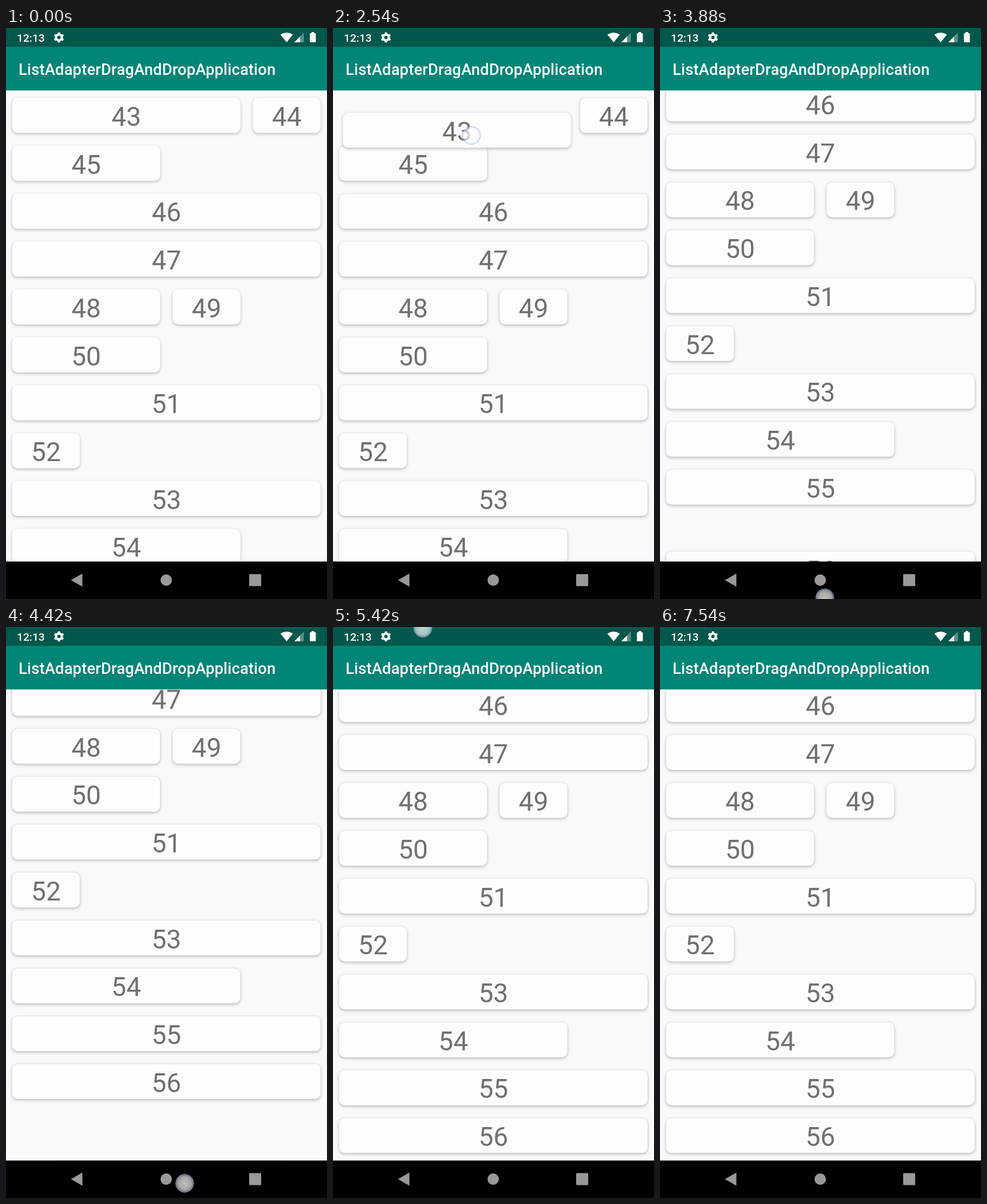
An HTML page with a canvas for the animation above (7.58 s loop, 561x998 px).

```html
<!DOCTYPE html>
<html lang="en">
<head>
<meta charset="utf-8">
<style>
  html, body { margin: 0; width: 100%; height: 100%; overflow: hidden; background: #000; }
  canvas { display: block; }
</style>
</head>
<body>
<canvas id="stage" width="561" height="998"></canvas>
<script>
const ctx = document.getElementById('stage').getContext('2d');
const LOOP = 7580, COL = 140.25, ROW = 83.7, LEFT = 10.5, TOP = 122;
const STATUS_END = 32.75, BAR_END = 109.16, NAV_TOP = 932.5;
const GRAB = { x: 225, y: 40 };
const RELEASE = 4720, REVERT = 4970, DRAG_START = 2420;

// Column spans of the cards 43 to 56
const spans = [3, 1, 2, 4, 4, 2, 1, 2, 4, 1, 4, 3, 4, 4];
// Moments at which the dragged card passes each following card
const swaps = [2640, 2650, 2730, 2820, 2900, 2920, 3010, 3110, 3210, 3310, 3420, 3600, 3790];

const touchPaths = [
  [[1850, 236, 162], [DRAG_START, 236, 162], [2540, 242, 187], [3420, 272, 905],
   [3880, 288, 996], [4300, 300, 990], [RELEASE, 342.5, 928.5]],
  [[4745, 283, 725], [4790, 280, 705], [5400, 157, 2], [5450, 157, 2]]
];
const scrollPath = [[3450, 0], [3650, 28], [3880, 103.3], [4150, 195.4]];
const END_SCROLL = 184.6;

const clamp = v => Math.min(1, Math.max(0, v));
const ease = v => (1 - Math.cos(Math.PI * clamp(v))) / 2;
const mix = (a, b, k) => a + (b - a) * k;

// Interpolates rows of [time, ...values], holding both ends
function sample(path, t) {
  let i = path.findIndex(p => p[0] > t);
  if (i < 0) return path[path.length - 1].slice(1);
  if (i === 0) return path[0].slice(1);
  const a = path[i - 1], b = path[i], k = (t - a[0]) / (b[0] - a[0]);
  return a.slice(1).map((v, n) => mix(v, b[n + 1], k));
}

// Flows the cards into four columns with the first one moved to `index`
function layout(index) {
  const order = spans.map((_, i) => i).slice(1);
  order.splice(index, 0, 0);
  const cells = [];
  let col = 0, row = 0;
  for (const i of order) {
    if (col + spans[i] > 4) { col = 0; row++; }
    cells[i] = { x: LEFT + col * COL, y: TOP + row * ROW };
    col += spans[i];
  }
  return cells;
}
const layouts = spans.map((_, i) => layout(i));

function cellAt(i, t) {
  const pos = { ...layouts[0][i] };
  if (t >= REVERT) return pos;
  swaps.forEach((start, n) => {
    const k = ease((t - start) / 250), a = layouts[n][i], b = layouts[n + 1][i];
    pos.x += (b.x - a.x) * k;
    pos.y += (b.y - a.y) * k;
  });
  return pos;
}

function draggedAt(t, scroll) {
  const [x, y] = sample(touchPaths[0], t);
  const held = { x: x - GRAB.x, y: y - GRAB.y };
  if (t < RELEASE) return held;
  const home = cellAt(0, t), k = ease((t - RELEASE) / (REVERT - RELEASE));
  return { x: mix(held.x, home.x, k), y: mix(held.y, home.y - scroll, k) };
}

function text(str, x, y, size, color, weight = 400, align = 'left', spacing = 0) {
  ctx.font = `${weight} ${size}px Roboto, sans-serif`;
  ctx.letterSpacing = `${spacing}px`;
  ctx.textAlign = align;
  ctx.fillStyle = color;
  ctx.fillText(str, x, y);
}

function shape(color, ...points) {
  ctx.fillStyle = color;
  ctx.beginPath();
  points.forEach(p => ctx.lineTo(...p));
  ctx.fill();
}

function disc(x, y, r, color) {
  ctx.fillStyle = color;
  ctx.beginPath();
  ctx.arc(x, y, r, 0, 7);
  ctx.fill();
}

function card(i, { x, y }, outline) {
  if (y > 940 || y < 20) return;
  const w = spans[i] * COL - 21.5;
  ctx.save();
  ctx.shadowColor = 'rgba(0,0,0,.25)';
  ctx.shadowBlur = 5;
  ctx.shadowOffsetY = 2;
  ctx.fillStyle = '#fdfdfd';
  ctx.beginPath();
  ctx.roundRect(x, y, w, 61.5, 10);
  ctx.fill();
  ctx.restore();
  ctx.strokeStyle = `rgba(0,0,0,${0.05 * outline})`;
  ctx.lineWidth = 1;
  ctx.stroke();
  text(43 + i, x + w / 2, y + 49, 46, '#707070', 400, 'center');
}

function list(t) {
  const scroll = t < REVERT ? sample(scrollPath, t)[0] : END_SCROLL;
  const dragging = t >= DRAG_START && t < REVERT;
  const outline = clamp(t / 800);
  for (let i = dragging ? 1 : 0; i < spans.length; i++) {
    const { x, y } = cellAt(i, t);
    card(i, { x, y: y - scroll }, outline);
  }
  if (dragging) card(0, draggedAt(t, scroll), outline);
}

function gear(x, y) {
  ctx.strokeStyle = '#fff';
  ctx.lineWidth = 4;
  ctx.beginPath();
  ctx.arc(x, y, 5, 0, 7);
  ctx.stroke();
  for (let n = 0; n < 6; n++) {
    const a = n * Math.PI / 3 + Math.PI / 6, c = Math.cos(a), s = Math.sin(a);
    ctx.beginPath();
    ctx.moveTo(x + c * 5, y + s * 5);
    ctx.lineTo(x + c * 8.8, y + s * 8.8);
    ctx.stroke();
  }
}

function bars() {
  ctx.fillStyle = '#008577';
  ctx.fillRect(0, 0, 561, BAR_END);
  ctx.fillStyle = '#00574b';
  ctx.fillRect(0, 0, 561, STATUS_END);
  text('ListAdapterDragAndDropApplication', 22, 81.5, 27.3, '#fff', 500, 'left', 0.18);

  text('12:13', 19, 24, 19.2, '#fff', 500);
  gear(92.5, 16.5);
  ctx.fillStyle = '#fff';
  ctx.beginPath();
  ctx.moveTo(490.5, 25);
  ctx.lineTo(479.5, 11.5);
  ctx.quadraticCurveTo(490.5, 4.5, 501.5, 11.5);
  ctx.fill();
  shape('rgba(255,255,255,.35)', [504, 25], [520.5, 25], [520.5, 8]);
  shape('#fff', [504, 25], [514, 25], [514, 14.7]);
  ctx.fillStyle = '#fff';
  ctx.fillRect(534, 7, 4.5, 3);
  ctx.beginPath();
  ctx.roundRect(531, 9, 10.5, 16, 1.5);
  ctx.fill();

  ctx.fillStyle = '#000';
  ctx.fillRect(0, NAV_TOP, 561, 998 - NAV_TOP);
  shape('#999', [113.5, 965], [133.5, 953.5], [133.5, 976.5]);
  disc(280, 965, 10, '#999');
  ctx.fillStyle = '#999';
  ctx.beginPath();
  ctx.roundRect(425, 954.5, 21, 21, 1.5);
  ctx.fill();
}

function touch(path, t) {
  if (t < path[0][0] || t >= path[path.length - 1][0]) return;
  const [x, y] = sample(path, t);
  const glow = ctx.createRadialGradient(x, y, 0, x, y, 16);
  glow.addColorStop(0, 'rgba(255,255,255,.75)');
  glow.addColorStop(0.75, 'rgba(250,250,255,.65)');
  glow.addColorStop(1, 'rgba(205,212,235,.4)');
  disc(x, y, 15.5, glow);
  ctx.strokeStyle = 'rgba(165,178,220,.5)';
  ctx.lineWidth = 1.8;
  ctx.stroke();
}

function draw(t) {
  ctx.fillStyle = '#f9f9fb';
  ctx.fillRect(0, 0, 561, 998);
  list(t);
  bars();
  touchPaths.forEach(path => touch(path, t));
}

function frame() {
  draw(performance.now() % LOOP);
  requestAnimationFrame(frame);
}
frame();
</script>
</body>
</html>
```
